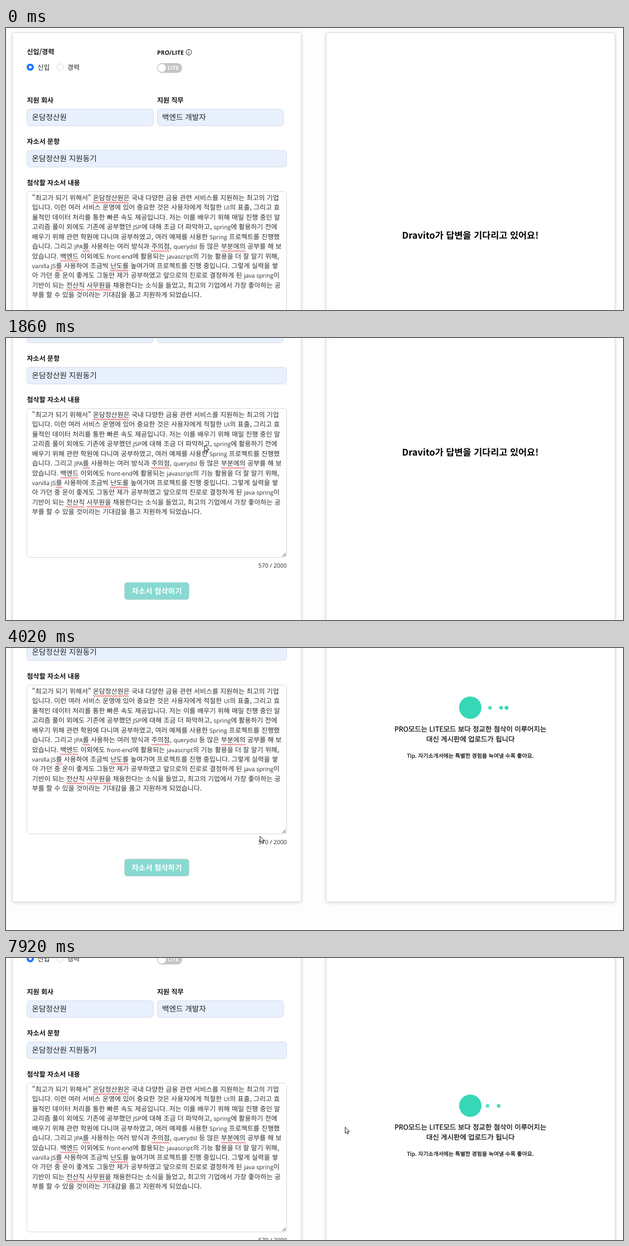
These frames come from a looping animation (1107 by 506 pixels, 7990 ms). An HTML page:

```html
<!DOCTYPE html>
<html lang="ko">
<head>
<meta charset="utf-8">
<style>
html, body { margin: 0; width: 100%; height: 100%; overflow: hidden; background: #fdfdfd; }
svg { display: block; }
text { font-family: "Noto Sans CJK KR", "Noto Sans KR", "Noto Sans CJK", sans-serif; white-space: pre; text-rendering: geometricPrecision; }
.latin { font-family: "Open Sans", "Noto Sans", sans-serif; font-size: .88em; }
.card { fill: #fff; stroke: #dcdcdc; filter: drop-shadow(0 1px 3px rgba(0, 0, 0, .14)); }
.field { fill: #e8f0fe; stroke: #d9dde5; }
.label { font-size: 12.05px; font-weight: 700; fill: #141414; }
.value { font-size: 13.6px; fill: #222; }
.option { font-size: 12px; fill: #222; }
.body { font-size: 11.93px; fill: #2b2b2b; }
.mid { text-anchor: middle; fill: #000; }
.note { stroke: #000; stroke-width: .2; }
.wave { fill: none; stroke: #e5383b; }
</style>
</head>
<body>
<svg width="1107" height="506" viewBox="0 0 1107 506">
  <g id="page">
    <rect class="card" x="11.5" y="8.5" width="518" height="674" rx="3"/>
    <rect class="card" x="574.5" y="8.5" width="518" height="674" rx="3"/>

    <circle cx="43.5" cy="70.3" r="6.4" fill="#1677ff"/>
    <circle cx="43.5" cy="70.3" r="2.5" fill="#fff"/>
    <circle cx="97.5" cy="70.3" r="6" fill="#fff" stroke="#d9d9d9"/>
    <g fill="none" stroke="#222">
      <circle cx="328" cy="43.5" r="5"/>
      <path d="M328 42.5v4M328 40.2v1.2"/>
    </g>
    <rect x="271" y="63" width="45" height="17.5" rx="8.7" fill="#c4c4c4"/>
    <circle cx="279.6" cy="71.7" r="7.3" fill="#fff"/>
    <text x="290" y="75.2" font-size="9.5" font-weight="700" fill="#fff">LITE</text>

    <rect class="field" x="37.5" y="145.5" width="227" height="30" rx="5"/>
    <rect class="field" x="271.5" y="145.5" width="226" height="30" rx="5"/>
    <rect class="field" id="question" x="37.5" y="219.5" width="466" height="30" rx="5"/>
    <rect id="area" x="37.5" y="293.5" width="466" height="267" rx="5" fill="#fff" stroke="#d9d9d9"/>
    <path d="M496 559l6-6M499.5 559l2.5-2.5" stroke="#333"/>

    <rect id="ripple" x="212.5" y="605.5" width="116" height="31" rx="5" fill="none" stroke="#4096ff"/>
    <rect id="button" x="212.5" y="605.5" width="116" height="31" rx="5" fill="#87d9d1" stroke="#d3dcdb"/>
    <text class="mid" x="270.5" y="626" font-size="13.4" font-weight="700" style="fill:#fff">자소서 첨삭하기</text>

    <text class="mid" id="waiting" x="833" y="378" font-size="16.4" font-weight="700">Dravito가 답변을 기다리고 있어요!</text>
    <g id="loading">
      <circle cx="833" cy="334" r="20" fill="#36d7b7"/>
      <g id="dots" fill="#36d7b7"></g>
      <text class="mid note" x="833.3" y="376.5" font-size="12.4">PRO모드는 LITE모드 보다 정교한 첨삭이 이루어지는</text>
      <text class="mid note" x="833.3" y="394.8" font-size="12.4">대신 게시판에 업로드가 됩니다</text>
      <text class="mid note" x="833" y="424" font-size="9.9" font-weight="500">Tip. 자기소개서에는 특별한 경험을 녹여낼 수록 좋아요.</text>
    </g>
  </g>
  <g id="cursor" fill="#fff" stroke="#222" stroke-linejoin="round">
    <path id="arrow" d="M.5 .5v11l2.5-2.4 1.8 3.9 1.8-.8-1.8-3.8h3.6z"/>
    <path id="beam" fill="none" d="M-2-7h4M0-7V7M-2 7h4"/>
    <path id="hand" d="M-1.2 8V.8Q0-.8 1.2 .8V5.5Q2.5 4.6 3.4 5.8 4.6 5.2 5.4 6.4 7 6 7.2 7.6V11.5Q7 14 5.8 16H-.2Q-1 13.5-3.4 10.4-4.4 8.4-2.8 8.4L-1.2 10z"/>
  </g>
</svg>
<script>
const LOOP = 7990, LOAD_AT = 3130;
const $ = id => document.getElementById(id);
const SVG = 'http://www.w3.org/2000/svg';

function add(parent, tag, attrs) {
  const el = parent.appendChild(document.createElementNS(SVG, tag));
  for (const k in attrs) el.setAttribute(k, attrs[k]);
  return el;
}

// Latin runs use a narrower face; {braces} mark words flagged by the spell checker.
function write(cls, x, y, str, anchor = 'start') {
  const el = add($('page'), 'text', { class: cls, x, y, 'text-anchor': anchor });
  for (const part of str.split(/(\{.+?\}|[A-Za-z0-9][A-Za-z0-9\/ -]*[A-Za-z0-9])/)) {
    if (!part) continue;
    const span = add(el, 'tspan', {});
    span.textContent = part.replace(/[{}]/g, '');
    if (part[0] === '{') {
      const n = span.textContent.length;
      const from = span.getStartPositionOfChar(0).x, to = span.getEndPositionOfChar(n - 1).x;
      const wave = 'q1-2.6 2 0t2 0'.repeat(Math.round((to - from) / 4));
      add($('page'), 'path', { class: 'wave', d: `M${from} ${y + 4.2}${wave}` });
    } else if (/^[A-Za-z0-9]/.test(part)) span.setAttribute('class', 'latin');
  }
}

write('label', 37.5, 47, '신입/경력');
write('label', 271, 47.5, 'PRO/LITE');
write('option', 56.5, 74.8, '신입');
write('option', 110, 74.8, '경력');
write('label', 37.5, 133.5, '지원 회사');
write('label', 271, 133.5, '지원 직무');
write('value', 46.5, 165.3, '온담정산원');
write('value', 280, 165.3, '백엔드 개발자');
write('label', 37.5, 207.5, '자소서 문항');
write('value', 46.5, 239.3, '온담정산원 지원동기');
write('label', 37.5, 281.5, '첨삭할 자소서 내용');
write('body', 504, 579, '570 / 2000', 'end');
`"최고가 되기 위해서" {온담정산원은} 국내 다양한 금융 관련 서비스를 지원하는 최고의 기업
입니다. 이런 여러 서비스 운영에 있어 중요한 것은 사용자에게 적절한 UI의 표출, 그리고 효
율적인 데이터 처리를 통한 빠른 속도 제공입니다. 저는 이를 배우기 위해 매일 진행 중인 알
고리즘 풀이 외에도 기존에 공부했던 JSP에 대해 조금 더 파악하고, spring에 활용하기 전에
배우기 위해 관련 학원에 다니며 공부하였고, 여러 예제를 사용한 Spring 프로젝트를 진행했
습니다. 그리고 JPA{를} 사용하는 여러 방식과 {주의점}, querydsl 등 많은 {부분에의} 공부를 해 보
았습니다. {백엔드} 이외에도 front-end에 활용되는 javascript의 기능 활용을 더 잘 알기 위해,
vanilla JS{를} 사용하여 조금씩 {난도를} 높여가며 프로젝트를 진행 중입니다. 그렇게 실력을 쌓
아 가던 중 운이 좋게도 그동안 제가 공부하였고 앞으로의 진로로 결정하게 된 java spring이
기반이 되는 {전산직} {사무원을} 채용한다는 소식을 들었고, 최고의 기업에서 가장 좋아하는 공
부를 할 수 있을 것이라는 기대감을 품고 지원하게 되었습니다.`
  .split('\n').forEach((line, i) => write('body', 46.8, 309 + i * 17.42, line));

const dots = [2, 3, 4, 5].map(() => add($('dots'), 'circle', { cy: 334.3, r: 3.33 }));

// Keys are [time, value, ...]; linear in between, held at both ends.
const scrollKeys = [[1380, 0], [1540, 71], [1700, 122], [1860, 167], [2020, 203], [2200, 227],
  [4130, 227], [4260, 145], [4410, 84], [4520, 72], [4610, 69]];
const cursorKeys = [[250, 1072, 492], [480, 790, 405], [700, 480, 295], [860, 370, 240], [960, 356, 234],
  [1130, 356, 234], [1280, 356, 192], [2240, 356, 192], [2500, 338, 268], [2750, 308, 372], [2900, 304, 386],
  [3850, 304, 386], [4120, 543, 309], [4670, 543, 309], [5000, 596, 305], [5300, 608, 304],
  [6320, 608, 304], [6400, 608, 303]];

function at(keys, t) {
  const i = keys.findIndex(k => k[0] > t);
  if (i <= 0) return keys[i ? keys.length - 1 : 0].slice(1);
  const a = keys[i - 1], b = keys[i], u = (t - a[0]) / (b[0] - a[0]);
  return a.slice(1).map((v, j) => v + (b[j + 1] - v) * u);
}

const show = (id, on) => $(id).style.display = on ? '' : 'none';
const inside = (id, x, y) => {
  const r = $(id), n = k => +r.getAttribute(k);
  return x >= n('x') && x <= n('x') + n('width') && y >= n('y') && y <= n('y') + n('height');
};

function draw(t) {
  const [scroll] = at(scrollKeys, t), [x, y] = at(cursorKeys, t);
  $('page').setAttribute('transform', `translate(0 ${-Math.round(scroll)})`);
  $('cursor').setAttribute('transform', `translate(${x} ${y})`);
  show('cursor', t >= 270);

  // Hover is not refreshed while the page is scrolling.
  const settled = t >= 270 && !(t > 1380 && t < 2240);
  const over = id => settled && inside(id, x, y + scroll);
  const onButton = over('button'), onText = over('question') || over('area');
  for (const id of ['question', 'area', 'button']) $(id).style.stroke = over(id) ? '#4096ff' : '';
  show('hand', onButton);
  show('beam', onText);
  show('arrow', !onButton && !onText);

  const spread = Math.min(1, Math.max(0, (t - LOAD_AT) / 500));
  $('ripple').style.strokeWidth = 1 + 8 * spread;
  $('ripple').style.opacity = t < LOAD_AT ? 0 : .15 * (1 - spread);

  show('waiting', t < LOAD_AT);
  show('loading', t >= LOAD_AT);
  const run = (t - LOAD_AT) * .000976;
  dots.forEach((dot, i) => {
    const p = Math.max(0, run - (i + 2) / 4) % 1;
    dot.setAttribute('cx', 898 - 80 * p);
    dot.setAttribute('opacity', p < .75 ? 1 - .4 * p : .7 + 1.2 * (p - .75));
  });
}

const start = performance.now();
(function tick() {
  draw((performance.now() - start) % LOOP);
  requestAnimationFrame(tick);
})();
</script>
</body>
</html>
```
